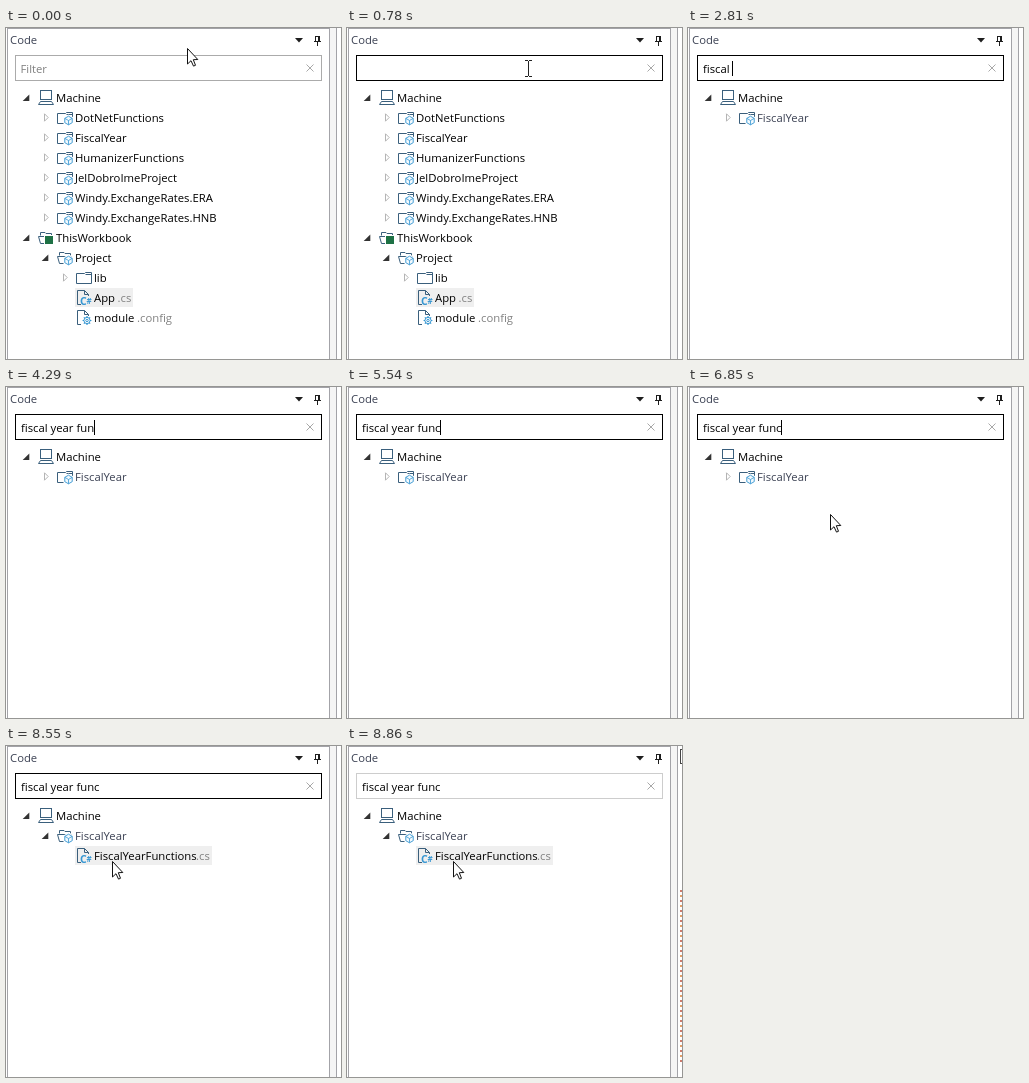
Write an HTML page with a canvas that moves like this. It is 335x331 px and loops after 9490 ms.

```html
<!DOCTYPE html>
<html lang="en">
<head>
<meta charset="utf-8">
<title>Code tree filter</title>
<style>
html, body { margin: 0; width: 100%; height: 100%; overflow: hidden; background: #fff; }
canvas { display: block; width: 335px; height: 331px; }
</style>
</head>
<body>
<canvas id="stage"></canvas>
<script>
const W = 335, H = 331, LOOP = 9490;
const FONT = '11.3px "Open Sans", "Noto Sans", sans-serif';
const SLATE = '#3a5f7c', BLUE = '#3596d2', GREEN = '#1e7145', EDGE = '#a3a3a8';

const canvas = document.getElementById('stage');
const ratio = window.devicePixelRatio || 1;
canvas.width = W * ratio;
canvas.height = H * ratio;
const c = canvas.getContext('2d');
c.scale(ratio, ratio);

// Typing: time at which each character appears.
const QUERY = 'fiscal year func';
const KEYS = [1240, 1390, 1560, 1790, 1860, 2260, 2810, 2960, 3190, 3340, 3740,
  3890, 4060, 4210, 4290, 5460];
const FOCUS = 240, BLUR = 8630, FILTERED = 2340, HOVER = 7390, EXPANDED = 7710,
  SELECTED = 8550, EDITOR = 8780;
const BLINKS = [240, 780, 1240, 4840, 5310, 6000, 6530, 7080, 7550, 8090];

// Pointer positions, each held until the next.
const POINTER = [
  [0, 181, 20], [80, 181, 49], [160, 181, 44], [240, 181, 40],
  [6700, 203, 74], [6780, 170, 112], [6850, 142, 127], [6930, 121, 126],
  [7010, 100, 119], [7080, 82, 110], [7160, 65, 102], [7240, 52, 97],
  [7390, 38, 95], [7470, 30, 94], [7550, 36, 92], [7630, 42, 91],
  [7940, 50, 95], [8020, 66, 102], [8090, 81, 108], [8170, 93, 112],
  [8240, 101, 114], [8320, 106, 115]
];

const row = (depth, state, icon, name, more) => ({ depth, state, icon, name, ...more });
const FULL = [
  row(0, 'open', laptop, 'Machine'),
  ...['DotNetFunctions', 'FiscalYear', 'HumanizerFunctions', 'JelDobroImeProject',
    'Windy.ExchangeRates.ERA', 'Windy.ExchangeRates.HNB']
    .map(name => row(1, 'closed', closedPackage, name)),
  row(0, 'open', workbook, 'ThisWorkbook'),
  row(1, 'open', openPackage, 'Project'),
  row(2, 'closed', folder, 'lib'),
  row(2, '', codeFile, 'App', { ext: '.cs', extX: 111.5, mark: 58 }),
  row(2, '', configFile, 'module', { ext: '.config', extX: 131 })
];

function filteredRows(t) {
  const open = t >= EXPANDED;
  const hot = t >= HOVER && t < 7940;
  const rows = [
    FULL[0],
    row(1, open ? 'open' : 'closed', open ? openPackage : closedPackage, 'FiscalYear',
      { dim: true, hot })
  ];
  if (open) rows.push(row(2, '', codeFile, 'FiscalYearFunctions',
    { ext: '.cs', extX: 190, mark: t >= SELECTED ? 137 : 0 }));
  return rows;
}

function rect(x, y, w, h, color) {
  c.fillStyle = color;
  c.fillRect(x, y, w, h);
}

function path(points, { fill, stroke, width = 1, close = true }) {
  c.beginPath();
  points.forEach(([x, y]) => c.lineTo(x, y));
  if (close) c.closePath();
  if (fill) { c.fillStyle = fill; c.fill(); }
  if (stroke) { c.strokeStyle = stroke; c.lineWidth = width; c.stroke(); }
}

function text(s, x, y, color) {
  c.font = FONT;
  c.fillStyle = color;
  c.fillText(s, x, y);
}

// Icons are drawn from the left edge x around the row centre y.
function laptop(x, y) {
  c.strokeStyle = SLATE;
  c.lineWidth = 1;
  c.strokeRect(x + 2.5, y - 7.5, 11, 9);
  path([[x + 2.5, y + 3.5], [x + 13.5, y + 3.5], [x + 15.5, y + 6.5], [x + 0.5, y + 6.5]],
    { stroke: SLATE });
}

function folder(x, y) {
  path([[x + 0.5, y + 5.5], [x + 0.5, y - 4.5], [x + 8.5, y - 4.5], [x + 9.5, y - 5.5],
    [x + 15.5, y - 5.5], [x + 15.5, y + 5.5]], { stroke: SLATE });
  path([[x + 9.5, y - 3.5], [x + 15.5, y - 3.5]], { stroke: SLATE, close: false });
}

function openFolder(x, y) {
  path([[x + 2.5, y - 2.5], [x + 2.5, y - 5.5], [x + 7, y - 5.5], [x + 8, y - 4.5],
    [x + 13.5, y - 4.5], [x + 13.5, y - 2.5]], { stroke: SLATE, close: false });
  path([[x + 0.5, y - 1.5], [x + 14.5, y - 1.5], [x + 13.5, y + 5.5], [x + 2.5, y + 5.5]],
    { stroke: SLATE });
}

function cube(x, y) {
  const at = (i, r) => [x + r * Math.sin(i * Math.PI / 3), y - r * Math.cos(i * Math.PI / 3)];
  const ring = r => [0, 1, 2, 3, 4, 5].map(i => at(i, r));
  path(ring(6), { fill: '#fff' });
  path(ring(4.3), { stroke: BLUE, fill: '#f2f9fd', width: 0.9 });
  [1, 3, 5].forEach(i => path([[x, y], at(i, 4.3)], { stroke: BLUE, width: 0.8, close: false }));
}

function closedPackage(x, y) { folder(x, y); cube(x + 11.5, y + 2.5); }
function openPackage(x, y) { openFolder(x, y); cube(x + 11.5, y + 2.5); }

function workbook(x, y) {
  openFolder(x, y);
  rect(x + 6, y - 3, 10, 10, '#fff');
  rect(x + 7, y - 2, 8, 8, GREEN);
}

function page(x, y, back) {
  path([[x + 1.5, y - 7.5], [x + 8.5, y - 7.5], [x + 12.5, y - 3.5], [x + 12.5, y + 6.5],
    [x + 1.5, y + 6.5]], { stroke: SLATE });
  path([[x + 8.5, y - 7.5], [x + 8.5, y - 3.5], [x + 12.5, y - 3.5]],
    { stroke: SLATE, close: false });
  rect(x + 5, y - 2, 11, 9, back);
}

function codeFile(x, y, back) {
  page(x, y, back);
  c.font = 'bold 10.5px "Open Sans", sans-serif';
  c.fillStyle = BLUE;
  c.fillText('C', x + 4, y + 6.5);
  c.font = 'bold 8px "Open Sans", sans-serif';
  c.fillText('#', x + 10.5, y + 5.5);
}

function configFile(x, y, back) {
  page(x, y, back);
  const gx = x + 11, gy = y + 2.5;
  c.strokeStyle = BLUE;
  c.lineWidth = 1;
  for (const r of [3.1, 1.2]) {
    c.beginPath();
    c.arc(gx, gy, r, 0, 7);
    c.stroke();
  }
  for (let i = 0; i < 8; i++) {
    const a = i * Math.PI / 4, u = Math.cos(a), v = Math.sin(a);
    path([[gx + 3 * u, gy + 3 * v], [gx + 4.4 * u, gy + 4.4 * v]],
      { stroke: BLUE, width: 1.2, close: false });
  }
}

function expander(x, y, state, hot) {
  if (state === 'open') {
    path([[x + 6.3, y - 3.6], [x + 6.3, y + 3], [x - 0.3, y + 3]],
      { fill: hot ? '#6fcdf2' : '#333' });
  } else if (state === 'closed') {
    path([[x + 2.5, y - 4.2], [x + 6.2, y - 0.5], [x + 2.5, y + 3.2]],
      { stroke: hot ? '#1cb0ea' : '#b4b4b4' });
  }
}

function drawRow(r, i) {
  const y = 70 + i * 20, x = 32 + r.depth * 19;
  if (r.mark) rect(x - 1, y - 10, r.mark, 19, '#efefef');
  expander(x - 15, y, r.state, r.hot);
  r.icon(x, y, r.mark ? '#efefef' : '#fff');
  text(r.name, x + 18, y + 4, r.dim ? '#3c4254' : '#000');
  if (r.ext) text(r.ext, r.extX, y + 4, '#808080');
}

function drawFrame(t) {
  rect(0, 0, W, H, '#fff');
  rect(324, 0, 7, H, '#f5f5f5');
  [1, 323, 330].forEach(x => rect(x, 0, 1, H, EDGE));
  rect(1, 0, 323, 1, EDGE);
  if (t >= EDITOR) {
    c.strokeStyle = '#444';
    c.lineWidth = 1;
    c.strokeRect(333.5, 3.5, 8, 14);
    for (let y = 144, i = 0; y < 317; y += 5, i++) {
      rect(333, y, 2, 2, i % 2 ? '#e3a06a' : '#cf7b6b');
    }
  }
  text('Code', 4, 16, '#3c4254');
  path([[289, 10], [297, 10], [293, 14.5]], { fill: '#1e1e1e' });
  // Pin
  rect(309, 8, 5, 1, '#1e1e1e');
  rect(309, 8, 1, 6, '#1e1e1e');
  rect(312, 8, 2, 6, '#1e1e1e');
  rect(308, 13, 7, 1, '#1e1e1e');
  rect(311, 14, 1, 4, '#1e1e1e');
}

function drawSearch(t) {
  const focused = t >= FOCUS && t < BLUR;
  const typed = QUERY.slice(0, KEYS.filter(k => k <= t).length);
  c.strokeStyle = focused ? '#000' : typed ? '#cdcdcd' : '#ababab';
  c.lineWidth = 1;
  c.strokeRect(9.5, 27.5, 306, 25);
  if (typed) text(typed, 15, 45, '#000');
  else if (!focused) text('Filter', 14.5, 45, '#808080');
  const lit = BLINKS.filter(b => b <= t).length % 2 === 1;
  if (focused && lit) {
    c.font = FONT;
    rect(Math.floor(15 + c.measureText(typed).width), 33, 1, 15, '#000');
  }
  path([[300.5, 36.5], [307.5, 43.5]], { stroke: '#a8a8a8', close: false });
  path([[307.5, 36.5], [300.5, 43.5]], { stroke: '#a8a8a8', close: false });
}

function drawPointer(t) {
  if (t >= KEYS[0] && t < 6700) return;
  const [, x, y] = POINTER.filter(p => p[0] <= t).pop();
  if (y > 27 && y < 53) {
    rect(x, y - 7, 1, 15, '#222');
    [-8, 8].forEach(d => {
      rect(x - 3, y + d, 3, 1, '#222');
      rect(x + 1, y + d, 3, 1, '#222');
    });
    return;
  }
  const shape = [[0, 0], [0, 15.5], [3.5, 12.2], [6, 17.6], [8, 16.8], [5.8, 11.2], [10.3, 11]];
  path(shape.map(([a, b]) => [x + 0.5 + a, y + 0.5 + b]), { fill: '#fff', stroke: '#111' });
}

function draw(now) {
  const t = now % LOOP;
  drawFrame(t);
  drawSearch(t);
  (t < FILTERED ? FULL : filteredRows(t)).forEach(drawRow);
  drawPointer(t);
}

const start = performance.now();
function tick() {
  draw(performance.now() - start);
  requestAnimationFrame(tick);
}
tick();
</script>
</body>
</html>
```
